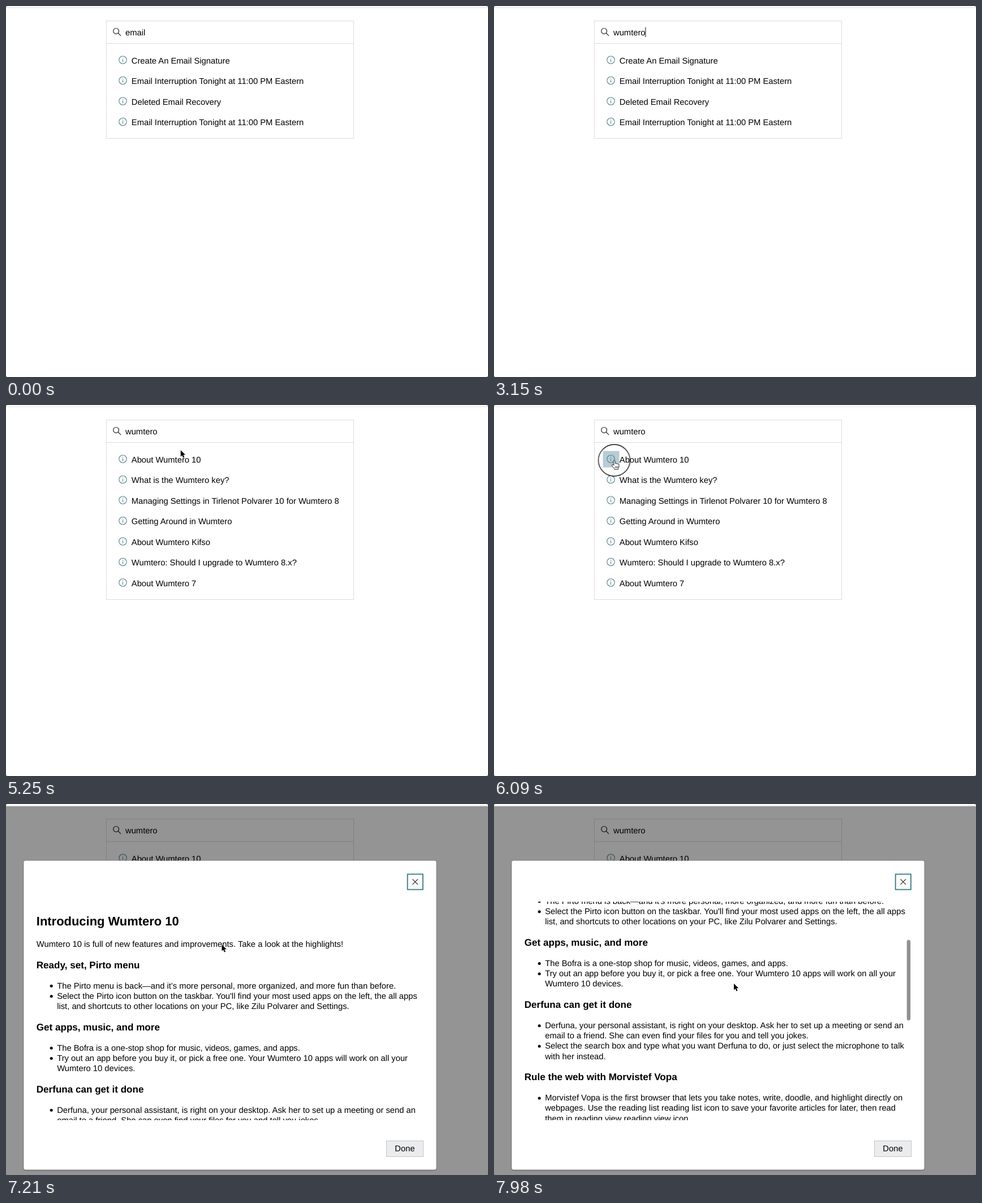
An HTML page that plays this animation: 852 by 657 pixels, repeating every 8000 ms.

```html
<!DOCTYPE html>
<html lang="en">
<head>
<meta charset="utf-8">
<title>Help search</title>
<style>
html, body { margin: 0; width: 100%; height: 100%; overflow: hidden; background: #fff; }
svg { display: block; width: 852px; height: 657px; }
text { font: 14.75px "Liberation Sans", Arial, sans-serif; text-rendering: geometricPrecision; fill: #000; white-space: pre; }
.h2 { font-size: 21.95px; font-weight: bold; }
.h3 { font-size: 17.07px; font-weight: bold; }
.line { fill: none; stroke: #dcdcdc; }
.ink { fill: none; stroke: #222; stroke-width: 1.2; }
.info { fill: none; stroke: #55818a; stroke-width: 1.1; }

/* 1% = 80 ms */
.step { animation: 8s step-end infinite; }
.move { animation: 8s linear infinite; }

.old { animation-name: old; }
@keyframes old { 0% { opacity: 1 } 42.875%, 100% { opacity: 0 } }
.load { animation-name: load; }
@keyframes load { 0% { opacity: 0 } 42.875% { opacity: 1 } 63%, 100% { opacity: 0 } }
.new { animation-name: new; }
@keyframes new { 0% { opacity: 0 } 63%, 100% { opacity: 1 } }

.before { animation-name: before; }
@keyframes before { 0% { opacity: 1 } 31.5%, 100% { opacity: 0 } }
.after { animation-name: after; }
@keyframes after { 0% { opacity: 0 } 31.5%, 100% { opacity: 1 } }
.select { animation-name: select; }
@keyframes select { 0% { opacity: 0 } 25.375% { opacity: 1 } 31.5%, 100% { opacity: 0 } }

/* a white cover with the caret on its left edge uncovers the letters */
.typing { animation-name: typing; }
@keyframes typing {
  0% { transform: translateX(246.3px) }
  31.5% { transform: translateX(221.7px) }
  34.125% { transform: translateX(229.9px) }
  35% { transform: translateX(242.1px) }
  35.875% { transform: translateX(246.2px) }
  37.625% { transform: translateX(254.4px) }
  38.5% { transform: translateX(259.4px) }
  39.375%, 100% { transform: translateX(267.8px) }
}
.caret { animation-name: caret; }
@keyframes caret {
  0% { opacity: 0 } 20.125% { opacity: 1 } 25.375% { opacity: 0 }
  31.5% { opacity: 1 } 45.5% { opacity: 0 } 57.75% { opacity: 1 }
  63.875% { opacity: 0 } 69.125% { opacity: 1 } 75.25%, 100% { opacity: 0 }
}

.spin { transform-origin: 396px 92px; animation: spin 8s linear infinite; }
@keyframes spin { from { transform: rotate(-247.5deg) } to { transform: rotate(2632.5deg) } }

.hover { animation-name: hover; }
@keyframes hover { 0% { opacity: 0 } 71.75% { opacity: 1 } 78.75%, 100% { opacity: 0 } }
.click { animation-name: click; }
@keyframes click { 0% { opacity: 0 } 75.25% { opacity: 1 } 78.75%, 100% { opacity: 0 } }
.modal { animation-name: modal; }
@keyframes modal { 0% { opacity: 0 } 78.75%, 100% { opacity: 1 } }
.focus { animation-name: focus; }
@keyframes focus { 0% { opacity: 0 } 81.375%, 100% { opacity: 1 } }

.doc { animation-name: doc; }
@keyframes doc {
  0%, 91% { transform: none; animation-timing-function: cubic-bezier(.4, 0, .7, 1) }
  99.75%, 100% { transform: translateY(-149.7px) }
}
.thumb { animation-name: thumb, flash; }
@keyframes thumb {
  0%, 91% { transform: none; animation-timing-function: cubic-bezier(.4, 0, .7, 1) }
  99.75%, 100% { transform: translateY(64.7px) }
}
/* the scrollbar fades out after opening and returns with scrolling */
@keyframes flash {
  0%, 85% { opacity: 1 } 88%, 91% { opacity: 0 } 91.1%, 100% { opacity: 1 }
}

.pointer { animation-name: pointer; }
@keyframes pointer {
  0%, .8% { transform: translate(481px, 566px); animation-timing-function: cubic-bezier(.3, 0, .3, 1) }
  10.5% { transform: translate(298px, 40px) }
  14%, 63% { transform: translate(276.5px, 53px) }
  65.625% { transform: translate(309px, 80px) }
  69.125% { transform: translate(226px, 94px); animation-timing-function: ease-out }
  73.5%, 78.5% { transform: translate(212.5px, 98px) }
  78.75%, 79% { transform: translate(213px, 97.5px); animation-timing-function: ease-in-out }
  89.25%, 90.25% { transform: translate(381.5px, 249px); animation-timing-function: ease-in-out }
  93.625%, 100% { transform: translate(424px, 318px) }
}
.arrow { animation-name: arrow; }
@keyframes arrow {
  0% { opacity: 0 } .875% { opacity: 1 } 7.125% { opacity: 0 }
  65% { opacity: 1 } 71.75% { opacity: 0 } 78.75%, 100% { opacity: 1 }
}
.beam { animation-name: beam; }
@keyframes beam {
  0% { opacity: 0 } 7.125% { opacity: 1 } 31.5% { opacity: 0 }
  63.875% { opacity: 1 } 65%, 100% { opacity: 0 }
}
</style>
</head>
<body>
<svg viewBox="0 0 852 657">
  <defs>
    <g id="info" class="info">
      <circle r="6.7"/>
      <path d="M0 -1.2V3.6M0 -3.7V-2.5"/>
    </g>
    <path id="bar" d="M-3 -7.3Q0 -7.3 0 -5.2Q0 -7.3 3 -7.3M0 -5.2V5.2M-3 7.3Q0 7.3 0 5.2Q0 7.3 3 7.3M-1.5 2.6H1.5"/>
    <clipPath id="view"><rect x="32" y="173.5" width="728" height="386"/></clipPath>
    <filter id="shadow" x="-5%" y="-5%" width="110%" height="110%">
      <feDropShadow dx="0" dy="1" stdDeviation="1.6" flood-opacity=".4"/>
    </filter>
  </defs>
  <rect width="852" height="657" fill="#fff"/>
  <path class="line" d="M0 3H852"/>

  <path class="line" d="M177.5 66V26.5H614.5V66M177 66.5H615"/>
  <g class="ink"><circle cx="194.6" cy="44.4" r="4.9"/><path d="M198.2 48L203 52.8"/></g>
  <rect class="step select" x="210.5" y="37.5" width="35.5" height="17.5" fill="#bcd8f8"/>
  <text class="step before" x="211" y="51.6">email</text>
  <text class="step after" x="211" y="51.6">wumtero</text>
  <g class="step typing">
    <rect x=".4" y="36" width="80" height="20" fill="#fff"/>
    <rect class="step caret" x="-.5" y="37.5" width="1" height="17.5"/>
  </g>

  <g class="step old" id="old"><path class="line" d="M177.5 67V234.5H614.5V67"/></g>
  <g class="step load">
    <path class="line" d="M177.5 67V118.5H614.5V67"/>
    <path class="spin" d="M404.8 93.9A9 9 0 1 1 404.8 90.1" fill="none" stroke="#4a8677" stroke-width="2.4"/>
  </g>
  <g class="step new" id="new">
    <path class="line" d="M177.5 67V344.5H614.5V67"/>
    <rect class="step hover" x="192.5" y="81.5" width="29" height="29" fill="#b8ccd4"/>
  </g>

  <g class="step modal">
    <rect y="4" width="852" height="653" fill-opacity=".42"/>
    <rect x="31.5" y="100.5" width="729" height="547" rx="3" fill="#fff" filter="url(#shadow)"/>
    <rect class="step focus" x="709.7" y="124.3" width="27.2" height="27.2" fill="none" stroke="#3c8087" stroke-width="1.9"/>
    <path class="ink" d="M718.5 133.2L728 142.7M728 133.2L718.5 142.7"/>
    <g clip-path="url(#view)"><g class="move doc" id="doc"></g></g>
    <rect class="move thumb" x="729.7" y="176" width="6.4" height="142.5" rx="3.2" fill="#919191"/>
    <rect x="672.5" y="596.5" width="65" height="28" fill="#ebecee" stroke="#c3c5c8"/>
    <text x="705" y="615.3" text-anchor="middle">Done</text>
  </g>

  <path d="M0 0H2L0 2ZM852 0H850L852 2ZM0 657H2L0 655ZM852 657H850L852 655Z" fill="#777"/>

  <g class="move pointer">
    <circle class="step click" r="28" fill="none" stroke="#111" stroke-width="1.3"/>
    <path class="step hover" d="M-1.4 1C-1.4 -.5 1.2 -.5 1.3 1L1.7 5.4Q3.4 4.6 4 6Q5.6 5.4 6.2 6.7Q8.4 6.2 8.5 8.2L8.2 11.4Q8 13 7 14.4V16H.2V14.6Q-2.4 12 -3.6 9.6Q-4.6 7.4 -3.2 7Q-2 6.9 -.6 8.9ZM2 10.5V13.5M4 10.5V13.5M6 10.5V13.5" fill="#fff" stroke="#111" stroke-width=".9" stroke-linejoin="round"/>
    <g class="step beam" fill="none" stroke-linecap="round">
      <use href="#bar" stroke="#fff" stroke-width="2.4"/>
      <use href="#bar" stroke="#111" stroke-width="1.1"/>
    </g>
    <path class="step arrow" d="M0 0V11.6L2.6 9.1L4.4 13.4L6.5 12.5L4.7 8.3H8.3Z" stroke="#fff" stroke-width=".9" paint-order="stroke"/>
  </g>
</svg>
<script>
const NS = 'http://www.w3.org/2000/svg';
const byId = id => document.getElementById(id);

function add(parent, tag, attrs, text = '') {
  const el = document.createElementNS(NS, tag);
  for (const key in attrs) el.setAttribute(key, attrs[key]);
  el.textContent = text;
  parent.append(el);
}

function fillList(id, titles) {
  titles.forEach((title, i) => {
    const y = 95.5 + i * 36.5;
    add(byId(id), 'use', { href: '#info', x: 206.5, y });
    add(byId(id), 'text', { x: 221.8, y: y + 6 }, title);
  });
}

fillList('old', [
  'Create An Email Signature',
  'Email Interruption Tonight at 11:00 PM Eastern',
  'Deleted Email Recovery',
  'Email Interruption Tonight at 11:00 PM Eastern'
]);
fillList('new', [
  'About Wumtero 10',
  'What is the Wumtero key?',
  'Managing Settings in Tirlenot Polvarer 10 for Wumtero 8',
  'Getting Around in Wumtero',
  'About Wumtero Kifso',
  'Wumtero: Should I upgrade to Wumtero 8.x?',
  'About Wumtero 7'
]);

// each section: heading, then bullets with their line breaks
const sections = [
  ['Ready, set, Pirto menu',
    'The Pirto menu is back—and it’s more personal, more organized, and more fun than before.',
    "Select the Pirto icon button on the taskbar. You'll find your most used apps on the left, the all apps\nlist, and shortcuts to other locations on your PC, like Zilu Polvarer and Settings."],
  ['Get apps, music, and more',
    'The Bofra is a one-stop shop for music, videos, games, and apps.',
    'Try out an app before you buy it, or pick a free one. Your Wumtero 10 apps will work on all your\nWumtero 10 devices.'],
  ['Derfuna can get it done',
    'Derfuna, your personal assistant, is right on your desktop. Ask her to set up a meeting or send an\nemail to a friend. She can even find your files for you and tell you jokes.',
    'Select the search box and type what you want Derfuna to do, or just select the microphone to talk\nwith her instead.'],
  ['Rule the web with Morvistef Vopa',
    'Morvistef Vopa is the first browser that lets you take notes, write, doodle, and highlight directly on\nwebpages. Use the reading list reading list icon to save your favorite articles for later, then read\nthem in reading view reading view icon.']
];

const doc = byId('doc'), left = 53.8, leading = 18.24;
add(doc, 'text', { class: 'h2', x: left, y: 214.7 }, 'Introducing Wumtero 10');
add(doc, 'text', { x: left, y: 253 }, 'Wumtero 10 is full of new features and improvements. Take a look at the highlights!');
let y = 290.8;
for (const [heading, ...bullets] of sections) {
  add(doc, 'text', { class: 'h3', x: left, y }, heading);
  y += 35.8;
  for (const bullet of bullets) {
    add(doc, 'circle', { cx: 80.2, cy: y - 4.3, r: 2.5 });
    for (const line of bullet.split('\n')) {
      add(doc, 'text', { x: 90.2, y }, line);
      y += leading;
    }
  }
  y += 19.5;
}
</script>
</body>
</html>
```
